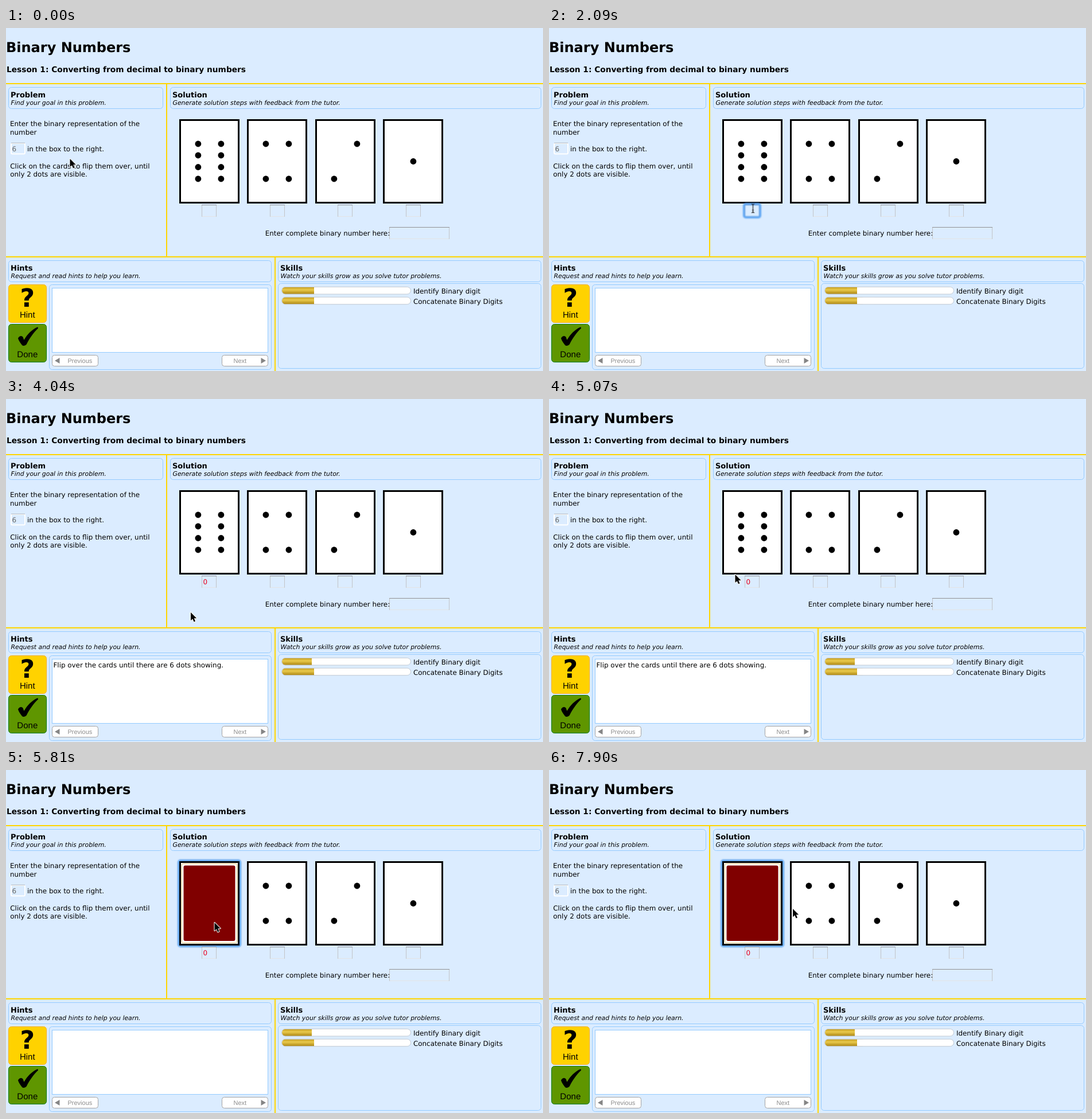
An HTML page for the animation above (8 s loop, 936 by 598 pixels).

```html
<!DOCTYPE html>
<html lang="en">
<head>
<meta charset="utf-8">
<title>Binary Numbers</title>
<style>
  html, body { margin: 0; width: 100%; height: 100%; overflow: hidden; background: #dbecff; }
  svg { display: block; width: 936px; height: 598px; }
  text { font: 11.9px "DejaVu Sans", sans-serif; text-rendering: geometricPrecision; white-space: pre; }
  .title { font-size: 24px; font-weight: bold; }
  .lesson { font-size: 13.72px; font-weight: bold; }
  .head { font-size: 13px; font-weight: bold; }
  .sub { font-size: 10.86px; font-style: italic; }
  .mark { font-size: 44px; font-weight: bold; text-anchor: middle; }
  .label { font: 15px "Liberation Sans", sans-serif; text-anchor: middle; }
  .nav { font: 11px "Liberation Sans", sans-serif; fill: #8c8c8c; }
</style>
</head>
<body>
<svg id="stage" viewBox="0 0 936 598">
  <defs>
    <linearGradient id="gold" x2="0" y2="1">
      <stop offset="0" stop-color="#c39c22"/>
      <stop offset=".4" stop-color="#e9c94a"/>
      <stop offset="1" stop-color="#ab8412"/>
    </linearGradient>
    <filter id="soft" x="-20%" y="-20%" width="140%" height="140%"><feGaussianBlur stdDeviation=".9"/></filter>
  </defs>
</svg>
<script>
const LOOP = 8000;
const stage = document.getElementById('stage');

function add(tag, attrs, parent = stage) {
  const el = document.createElementNS('http://www.w3.org/2000/svg', tag);
  for (const name in attrs) el.setAttribute(name, attrs[name]);
  return parent.appendChild(el);
}
const group = () => add('g', {});
const rect = (x, y, width, height, attrs, parent) => add('rect', { x, y, width, height, ...attrs }, parent);
const path = (d, attrs, parent) => add('path', { d, ...attrs }, parent);
function text(x, y, content, cls = '', parent = stage) {
  const el = add('text', { x, y, class: cls }, parent);
  el.textContent = content;
  return el;
}

// Hard-step animation of one CSS property from [time, value] pairs.
function steps(el, prop, table) {
  const frames = table.map(([time, value]) => ({ offset: time / LOOP, [prop]: value, easing: 'steps(1, end)' }));
  frames.push({ offset: 1, [prop]: table[table.length - 1][1] });
  el.animate(frames, { duration: LOOP, iterations: Infinity });
}
function showBetween(el, from, to = LOOP) {
  const table = [[0, 0], [from, 1]];
  if (to < LOOP) table.push([to, 0]);
  steps(el, 'opacity', table);
}

function panel(x, y, w, h, fill = 'none', rx = 5) {
  rect(x + .5, y + .5, w - 1, h - 1, { rx, fill, stroke: '#94cbff' });
}
function header(x, y, w, title, subtitle) {
  panel(x, y, w, 38);
  text(x + 4, y + 18, title, 'head');
  text(x + 4.5, y + 31, subtitle, 'sub');
}
function field(x, y, w, h) {
  rect(x + .5, y + .5, w - 1, h - 1, { fill: '#dbecff', stroke: '#c2c4c7' });
  path(`M${x} ${y + .5}h${w}`, { stroke: '#929292' });
  path(`M${x + 1} ${y + h - .5}h${w - 2}`, { stroke: '#e4e4e4' });
}
function glow(x, y, w, h) {
  const g = group();
  rect(x - 1, y - 1, w + 2, h + 2, { rx: 3, fill: 'none', stroke: '#5fa5f2', 'stroke-width': 4, filter: 'url(#soft)' }, g);
  return g;
}

// Page frame
rect(0, 0, 936, 598, { fill: '#dbecff' });
path('M0 97H936M280 97V399M0 399H936M469 399V598', { stroke: '#ffd500', 'stroke-width': 2 });
text(0, 42, 'Binary Numbers', 'title');
text(1, 76.5, 'Lesson 1: Converting from decimal to binary numbers', 'lesson');
header(4, 103, 270, 'Problem', 'Find your goal in this problem.');
header(286, 103, 647, 'Solution', 'Generate solution steps with feedback from the tutor.');
header(4, 405, 459, 'Hints', 'Request and read hints to help you learn.');
header(474, 405, 459, 'Skills', 'Watch your skills grow as you solve tutor problems.');

// Problem
text(7, 171, 'Enter the binary representation of the');
text(7, 185.5, 'number');
text(37, 215, 'in the box to the right.');
text(7.3, 244.5, 'Click on the cards to flip them over, until');
text(7.3, 259, 'only 2 dots are visible.');
rect(9, 201, 24, 18.5, { rx: 2, fill: '#dbecff', stroke: '#fff', 'stroke-width': 2 });
path('M9 200.5H33', { stroke: '#b4b8bd' });
text(10.5, 215, '6').setAttribute('fill', '#666');

// Solution
const cardGlow = glow(302, 159, 105, 147);
const cardX = [302, 420, 539, 657];
const rows = [202, 222, 242.5, 263];
const dots = [
  rows.flatMap(y => [[-20, y], [20, y]]),
  [[-20, 202], [20, 202], [-20, 263], [20, 263]],
  [[20, 202], [-20, 263]],
  [[0, 232.5]]
];
const inputX = [341, 460, 578, 697];
const faces = cardX.map((x, i) => {
  rect(x + 1.5, 160.5, 102, 144, { fill: '#fff', stroke: '#000', 'stroke-width': 3 });
  const face = group();
  for (const [dx, cy] of dots[i]) add('circle', { cx: x + 52.9 + dx, cy, r: 5.4 }, face);
  field(inputX[i], 308, 26, 21);
  return face;
});
const back = group();
rect(306.5, 163.5, 96, 138, { rx: 2, fill: '#fff', stroke: '#dfc071' }, back);
rect(309.5, 166.5, 90, 131.5, { rx: 3, fill: '#800000' }, back);

text(451.8, 362, 'Enter complete binary number here:');
field(668, 347, 105, 21);

// Hints
function bigButton(y, fill, stroke, label) {
  rect(4.5, y + .5, 66, 66, { rx: 5, fill, stroke });
  text(37.3, y + 58, label, 'label');
}
bigButton(447, '#ffd200', '#f3ae1c', 'Hint');
bigButton(516, '#5f9600', '#0b7a0b', 'Done');
text(37.3, 486, '?', 'mark');
path('M21 541C23 537 28 535 30 540C31 543 31 544 32 543C37 534 45 526 54.5 521.5C56 521.5 56.500 523 55.500 524C48 531 41 541 36 551C35 553.500 30 555 28 553C25 549 22 545 21 541Z');
panel(75, 447, 388, 149);
panel(80, 453, 377, 113, '#fff', 0);
const hint = text(82.5, 468, 'Flip over the cards until there are 6 dots showing.');
for (const x of [80, 376]) rect(x + .5, 570.5, 80, 19, { rx: 4, fill: '#fff', stroke: '#a3a3a3' });
text(107.5, 584, 'Previous', 'nav');
text(396.500, 584, 'Next', 'nav');
path('M85 580l8.500-5v10zM453 580l-8.500-5v10z', { fill: '#858585' });

// Skills
panel(474, 445, 459, 149);
function skill(y, name) {
  rect(481, y, 224, 12.5, { rx: 6, fill: '#fff' });
  rect(481, y, 70, 12.5, { rx: 6, fill: 'url(#gold)' });
  const cover = rect(537, y, 30, 12.5, { fill: '#fff' });
  rect(480.5, y, 225, 12.5, { rx: 6.2, fill: 'none', stroke: '#c3cad2' });
  text(710, y + 11.5, name);
  return cover;
}
const digitSkill = skill(451.5, 'Identify Binary digit');
skill(469.2, 'Concatenate Binary Digits');

// Typed digit
const inputGlow = glow(341, 308, 26, 21);
const digit = text(343.5, 323, '0');
const caret = path('M0 312V325', { stroke: '#000' });

// Pointers
const arrow = group();
path('M0 0V14.200L3.300 11.200L5.600 16.500L8 15.500L5.800 10.300H10.200Z',
  { stroke: '#fff', 'stroke-width': 2, 'paint-order': 'stroke', 'stroke-linejoin': 'round' }, arrow);
const beam = group();
path('M-2.500 -7.500Q0 -7.500 0 -5.500Q0 -7.500 2.500 -7.500M0 -6V6M-2.500 7.500Q0 7.500 0 5.500Q0 7.500 2.500 7.500M-1.500 3H1.500',
  { fill: 'none', stroke: '#111', 'stroke-width': 1.1 }, beam);

const move = (el, table) =>
  steps(el, 'transform', table.map(([time, x, y]) => [time, `translate(${x}px, ${y}px)`]));

move(arrow, [
  [0, 111.5, 228], [450, 124, 221], [600, 162, 207], [750, 218, 199], [900, 285, 212],
  [1040, 343, 240], [1190, 376.5, 265], [1340, 380, 282], [1490, 357, 304],
  [3890, 346, 331], [4040, 322, 372], [4190, 292, 418], [4330, 266, 454], [4480, 251, 471], [4620, 247, 476],
  [4920, 281, 402], [5070, 324.5, 306], [5220, 352, 277], [5370, 361, 268], [5510, 363.5, 266],
  [7160, 382, 265], [7310, 500, 262], [7460, 665, 266], [7610, 774, 268], [7750, 590, 255], [7900, 425, 242]
]);
steps(arrow, 'opacity', [[0, 1], [1640, 0], [3890, 1]]);
move(beam, [[0, 358, 317], [2090, 355.5, 314.5]]);
showBetween(beam, 1640, 3890);

showBetween(inputGlow, 2090, 3290);
showBetween(caret, 2240, 3290);
move(caret, [[0, 344.5, 0], [2990, 352.5, 0]]);
showBetween(digit, 2840);
steps(digit, 'fill', [[0, '#000'], [3290, '#e8001c']]);
showBetween(hint, 3290, 5660);
move(digitSkill, [[0, 0, 0], [3290, -4, 0]]);

steps(faces[0], 'opacity', [[0, 1], [5660, 0]]);
showBetween(cardGlow, 5660);
showBetween(back, 5810);
</script>
</body>
</html>
```
